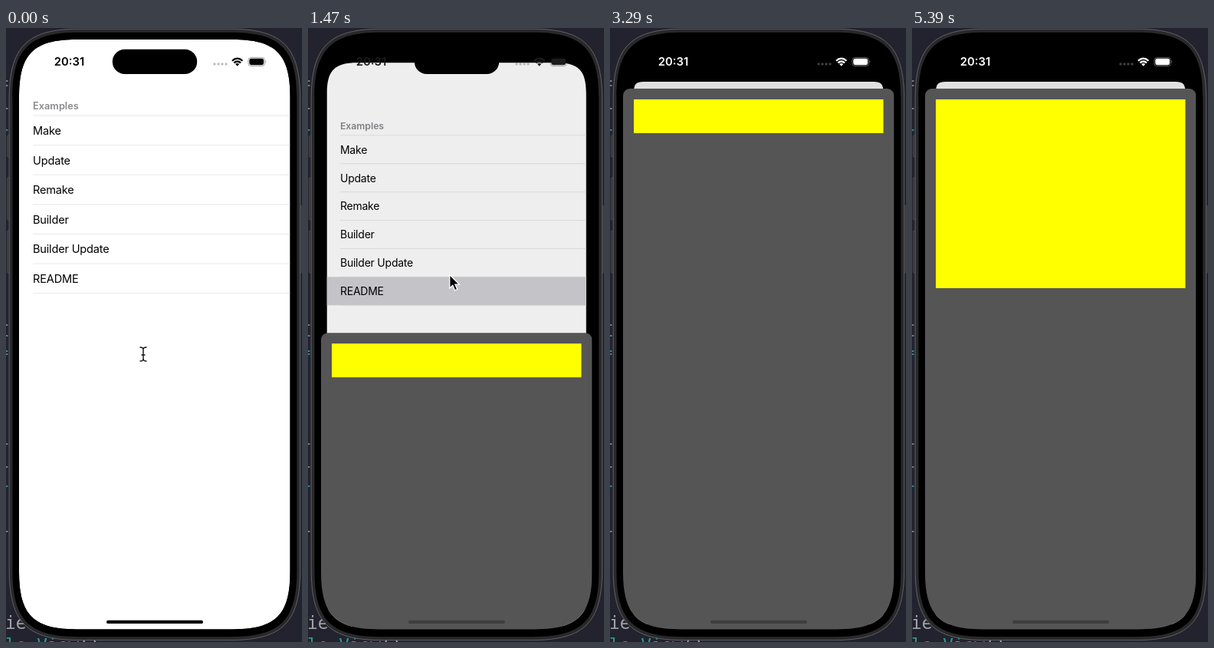
An HTML page that plays this animation: 386x800 px, repeating every 6.3 s.

```html
<!DOCTYPE html>
<html lang="en">
<head>
<meta charset="utf-8">
<title>Sheet layout demo</title>
<style>
  html, body { margin: 0; width: 100%; height: 100%; overflow: hidden; background: #22232e; }
  svg { display: block; width: 100vw; height: 100vh; }
  text { font-family: Inter, "Open Sans", sans-serif; }
  .row { font-size: 14.6px; letter-spacing: -.2px; }
  .header { font-size: 12.8px; font-weight: 600; fill: #8a8a8e; }
  .time { font-size: 14.8px; font-weight: 600; text-anchor: middle; }
  .code { font: 22.8px "DejaVu Sans Mono", monospace; fill: #a3a4aa; }
  .teal { fill: #2b9a98; }
</style>
</head>
<body>
<svg viewBox="0 0 386 800">
  <defs>
    <clipPath id="screen"><path id="screenShape"/></clipPath>
  </defs>

  <!-- editor behind the phone -->
  <rect width="386" height="800" fill="#22232e"/>
  <g id="specks"></g>
  <text class="code" x="-1" y="783">ie</text>
  <text class="code teal" x="-1" y="812">le View<tspan fill="#a3a4aa">()</tspan></text>

  <!-- phone body -->
  <g fill="#333336" stroke="#4c4c50" stroke-width=".8">
    <rect x="1.5" y="140" width="5" height="28" rx="1"/>
    <rect x="1.5" y="195" width="5" height="55" rx="1"/>
    <rect x="1.5" y="264" width="5" height="55" rx="1"/>
    <rect x="381" y="231" width="4.5" height="88" rx="1"/>
  </g>
  <path id="body" fill="#29292b" stroke="#626265"/>
  <path id="bezel"/>

  <g clip-path="url(#screen)">
    <g id="page">
      <path class="card" fill="#fff"/>
      <text class="header" x="35" y="106">Examples</text>
      <g id="rows"></g>
      <path class="card" id="dim"/>
    </g>
    <g id="sheet">
      <rect x="17" width="353.5" height="800" rx="9" fill="#555"/>
      <rect id="box" x="31" y="14" width="325.5" fill="#ff0"/>
    </g>
  </g>

  <rect x="138.8" y="27.8" width="110.4" height="32.2" rx="16.1"/>
  <g id="status">
    <text class="time" x="82.5" y="49.4">20:31</text>
    <g opacity=".25">
      <circle cx="272" cy="47" r="1.7"/><circle cx="277" cy="47" r="1.7"/>
      <circle cx="282" cy="47" r="1.7"/><circle cx="287" cy="47" r="1.7"/>
    </g>
    <g fill="none" stroke="currentColor" stroke-width="2.2">
      <path d="M294.9 42.7Q301.7 36.6 308.5 42.7M297.3 45.4Q301.7 41.6 306.1 45.4"/>
    </g>
    <path d="M299.2 47Q301.7 45 304.2 47L301.7 49.7Z"/>
    <rect x="315.9" y="38.4" width="21.6" height="11.2" rx="3.6" fill="none" stroke="currentColor" stroke-width=".9" opacity=".4"/>
    <rect x="317.3" y="39.8" width="18.8" height="8.4" rx="2.4"/>
    <path d="M338.6 42.2Q340.4 44 338.6 45.8Z" opacity=".45"/>
  </g>
  <rect id="home" x="131" y="771.7" width="126" height="4.4" rx="2.2"/>

  <g id="beam" fill="none" stroke-linecap="round">
    <path d="M-4-9Q0-9 0-6Q0-9 4-9M0-6V6M-4 9Q0 9 0 6Q0 9 4 9M-2 1H2" stroke="#fff" stroke-width="3"/>
    <path d="M-4-9Q0-9 0-6Q0-9 4-9M0-6V6M-4 9Q0 9 0 6Q0 9 4 9M-2 1H2" stroke="#111" stroke-width="1.4"/>
  </g>
  <path id="arrow" d="M0 0V17.5L4 13.8L6.8 20.3L10 19L7.2 12.6H12.6Z" stroke="#fff" stroke-width="1.3"/>
</svg>

<script>
const LOOP = 6300, TICK = 70;
const $ = id => document.getElementById(id);
const set = (el, attrs) => { for (const k in attrs) el.setAttribute(k, attrs[k]); };
const add = (parent, tag, attrs, text = "") => {
  const el = document.createElementNS("http://www.w3.org/2000/svg", tag);
  set(el, attrs);
  el.textContent = text;
  return parent.appendChild(el);
};
const clamp = v => Math.min(1, Math.max(0, v));
const mix = (a, b, p) => a + (b - a) * p;
const ramp = (t, from, to) => clamp((t - from) / (to - from));
const smooth = p => p * p * (3 - 2 * p);
const gray = v => `rgb(${[v, v, v].map(Math.round)})`;
// critically damped spring, 0 to 1
const spring = (t, start, rate) => {
  const x = Math.max(0, t - start) / 1000 * rate;
  return 1 - (1 + x) * Math.exp(-x);
};
// rectangle with continuous corners, each reaching e along its sides
const squircle = (x, y, w, h, e) => {
  const c = e * .75, r = e - c;
  return `M${x + e} ${y}h${w - 2 * e}c${c} 0 ${e} ${r} ${e} ${e}` +
    `v${h - 2 * e}c0 ${c} ${-r} ${e} ${-e} ${e}` +
    `h${2 * e - w}c${-c} 0 ${-e} ${-r} ${-e} ${-e}` +
    `v${2 * e - h}c0 ${-c} ${r} ${-e} ${e} ${-e}z`;
};

const CORNER = 75;
const screenPath = corner => squircle(17, 15, 353.5, 768.4, corner);
set($("screenShape"), { d: screenPath(CORNER) });
set($("body"), { d: squircle(4.2, 1.2, 379.4, 796.4, 92) });
set($("bezel"), { d: squircle(8.5, 5.8, 370.8, 787.4, 86) });

const PITCH = 38.6, TOP = 114;
const labels = ["Make", "Update", "Remake", "Builder", "Builder Update", "README"];
const line = y => add($("rows"), "path", { d: `M35 ${y}H370.5`, stroke: "#e3e3e6", "stroke-width": .8 });
line(TOP);
labels.forEach((_, i) => line(TOP + PITCH * (i + 1)));
const highlight = add($("rows"), "rect",
  { x: 17, y: TOP + PITCH * 5, width: 353.5, height: PITCH, fill: "#d1d1d6" });
labels.forEach((label, i) =>
  add($("rows"), "text", { class: "row", x: 35, y: TOP + PITCH * i + 24.9 }, label));

const speck = (y, fill) => add($("specks"), "rect", { x: 0, y, width: 2.5, height: 2, fill });
[68, 74, 104, 386, 400, 541, 571, 655].forEach(y => speck(y, "#77787f"));
[132, 420, 424, 596].forEach(y => speck(y, "#2b8a88"));

const cards = document.querySelectorAll(".card");

function draw(t) {
  const p = spring(t, 1365.5, 17.6);
  const scale = mix(1, .92, p);
  set($("page"), { transform:
    `translate(${193.75 - 176.75 * scale} ${mix(15, 70, p)}) scale(${scale}) translate(-17 -15)` });
  const cardPath = screenPath(mix(CORNER, 14, p));
  cards.forEach(card => set(card, { d: cardPath }));
  set($("dim"), { opacity: .12 * p });
  set(highlight, { opacity: t >= 1260 ? 1 : 0 });

  set($("sheet"), { transform: `translate(0 ${mix(784, 79, p)})` });
  set($("box"), { height: mix(44, 246, smooth(ramp(t, 3538, 3838))) });

  const tone = gray(255 * ramp(t, 1440, 1710));
  set($("status"), { fill: tone, color: tone });
  set($("home"), { fill: gray(62 * ramp(t, 1365, 1470)) });

  const move = smooth(ramp(t, 640, 840));
  set($("beam"), {
    transform: `translate(${mix(179, 185, move)} ${mix(425, 323, move)})`,
    opacity: t < 1120 ? 1 : 0
  });
  const drift = ramp(t, 1470, 1680);
  set($("arrow"), {
    transform: `translate(${mix(184.7, 186.7, drift)} ${mix(321.5, 325.5, drift)})`,
    opacity: t >= 1120 && t < 1890 ? 1 : 0
  });
}

const start = performance.now();
function frame() {
  const t = (performance.now() - start) % LOOP;
  draw(Math.floor((t + 1) / TICK) * TICK % LOOP);
  requestAnimationFrame(frame);
}
frame();
</script>
</body>
</html>
```
